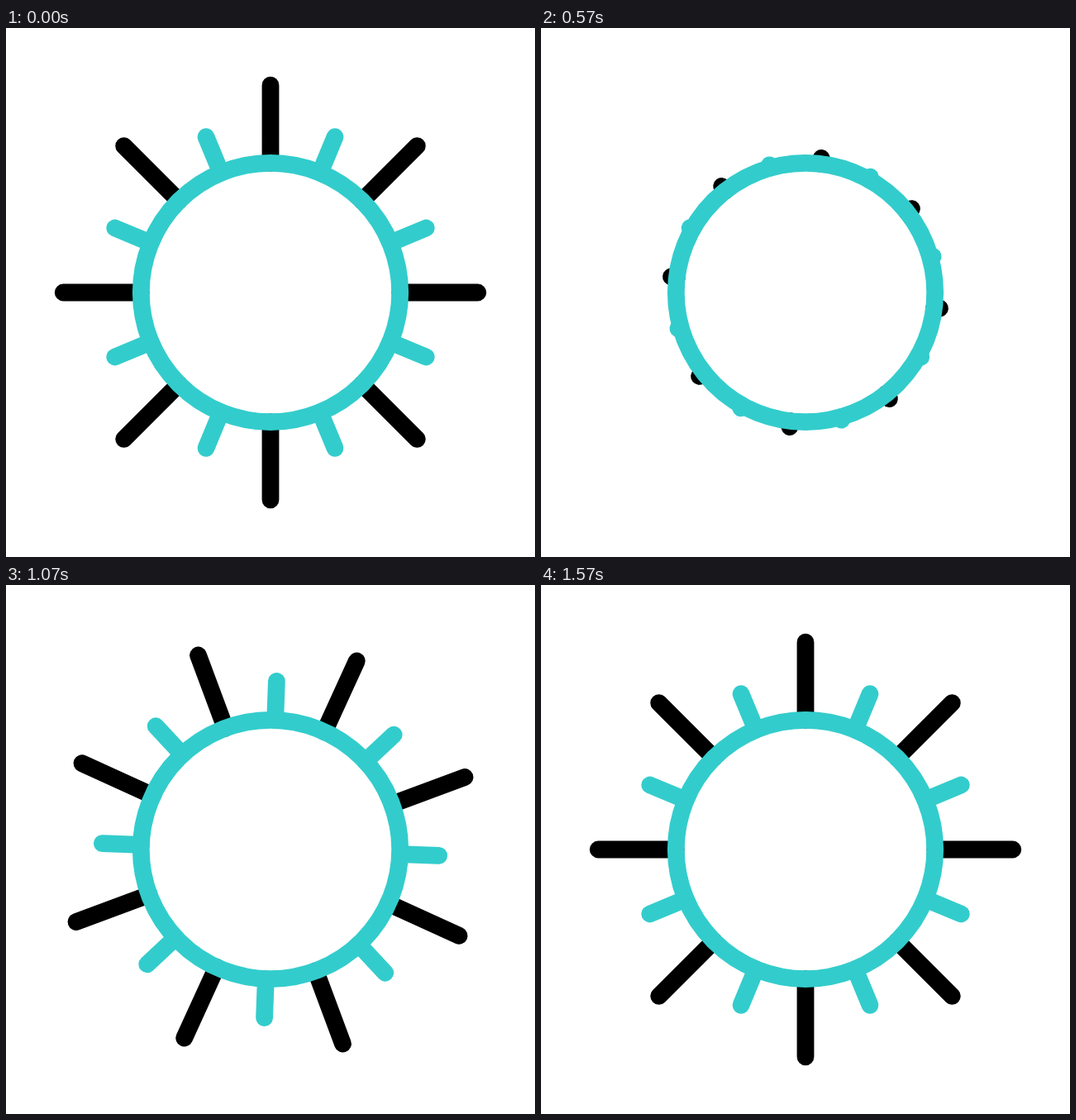
An HTML page with a canvas for the animation above (1670 ms loop, 640 px wide and 640 px high).

```html
<!DOCTYPE html>
<html lang="en">
<head>
<meta charset="utf-8">
<title>Sun</title>
<style>
  html, body { margin: 0; width: 100%; height: 100%; overflow: hidden; background: #fff; }
  canvas { display: block; width: 100vw; height: 100vh; }
</style>
</head>
<body>
<canvas id="stage" width="640" height="640"></canvas>
<script>
const ctx = document.getElementById('stage').getContext('2d');
const TEAL = '#33cccc', BLACK = '#000';
const LOOP = 1670, FPS = 30, LAST = 47;
const RING = 156.7;

const clamp = x => Math.min(1, Math.max(0, x));
const smooth = x => x * x * (3 - 2 * x);

// cubic-bezier(.433, 0, .567, 1)
function ease(x) {
  let lo = 0, hi = 1;
  for (let i = 0; i < 30; i++) {
    const v = (lo + hi) / 2;
    if (v + 0.3 * v * (1 - v) * (1 - 2 * v) < x) lo = v; else hi = v;
  }
  return smooth(lo);
}

// Rises from 0 to 1 until the peak, then falls back to 0 at the end
const thereAndBack = (step, peak, end, curve) =>
  curve(clamp(step < peak ? step / peak : (end - step) / (end - peak)));

function rays(color, tip, offset, length) {
  ctx.strokeStyle = color;
  ctx.beginPath();
  for (let i = 0; i < 8; i++) {
    const a = (offset + i * 45) * Math.PI / 180;
    const end = RING + (tip - RING) * length;
    ctx.moveTo(RING * Math.sin(a), -RING * Math.cos(a));
    ctx.lineTo(end * Math.sin(a), -end * Math.cos(a));
  }
  ctx.stroke();
}

function draw(ms) {
  const step = Math.min(LAST, Math.floor((ms + 3.4) * FPS / 1000));
  const turn = -38.5 * thereAndBack(step, 18, LAST, ease);
  const length = 1 - thereAndBack(step, 16, 22, smooth);

  ctx.setTransform(1, 0, 0, 1, 320, 320);
  ctx.fillStyle = '#fff';
  ctx.fillRect(-320, -320, 640, 640);
  ctx.lineWidth = 20.8;
  ctx.lineCap = 'round';
  rays(BLACK, 250.8, turn, length);
  rays(TEAL, 203.8, turn + 22.5, length);
  ctx.beginPath();
  ctx.arc(0, 0, RING, 0, 2 * Math.PI);
  ctx.stroke();
}

function tick() {
  draw(performance.now() % LOOP);
  requestAnimationFrame(tick);
}
tick();
</script>
</body>
</html>
```
